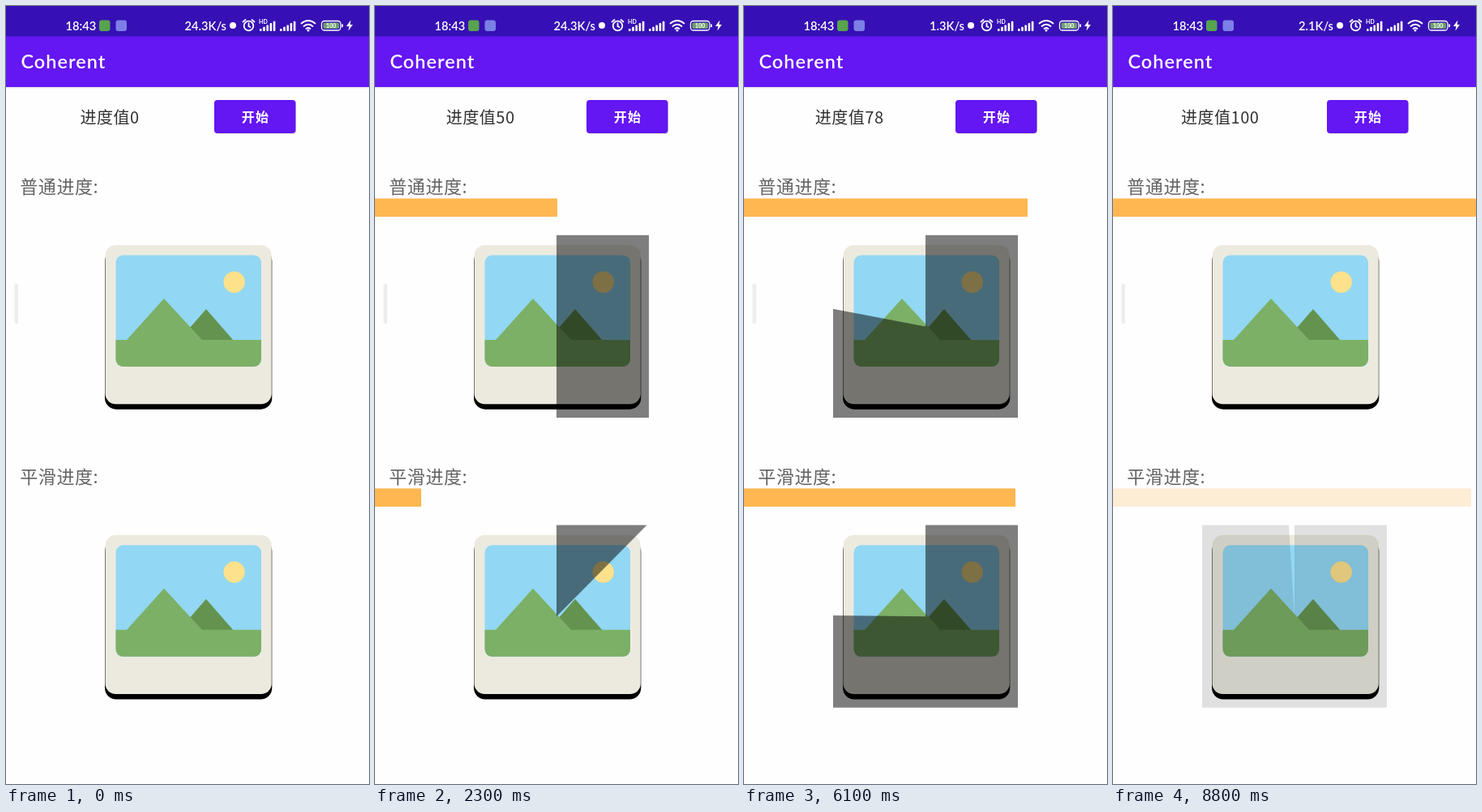
Animation, 448 px wide and 960 px high, one loop 8900 ms. Source, as an HTML page:

```html
<!DOCTYPE html>
<html lang="zh">
<head>
<meta charset="utf-8">
<title>Coherent</title>
<style>
  html, body { margin: 0; width: 100%; height: 100%; overflow: hidden; background: #fefefe; }
  svg { display: block; width: 448px; height: 960px; }
  text { font-family: "Noto Sans CJK SC", "Noto Sans CJK", "Noto Sans CJK JP", sans-serif; }
  .latin { font-family: Lato, "Open Sans", sans-serif; fill: #fff; }
  .status { font-size: 14.7px; font-weight: 600; }
  .tiny { font-size: 7px; font-weight: 700; }
  .label { font-size: 22px; letter-spacing: .6px; fill: #636363; }
  .line { fill: none; stroke: #fff; stroke-width: 1.8; stroke-linecap: round; }
</style>
</head>
<body>
<svg viewBox="0 0 448 960">
  <defs>
    <linearGradient id="shadow" x2="0" y2="1">
      <stop stop-color="#000" stop-opacity=".1"/>
      <stop offset="1" stop-color="#000" stop-opacity="0"/>
    </linearGradient>
    <filter id="soften"><feGaussianBlur stdDeviation=".7"/></filter>
    <clipPath id="sky"><rect x="135.5" y="307.5" width="179.5" height="137.5" rx="9"/></clipPath>
    <clipPath id="area"><rect x="110" y="282.8" width="228" height="225.2"/></clipPath>
    <g id="picture" filter="url(#soften)">
      <rect x="122" y="301" width="206.3" height="196.7" rx="14"/>
      <rect x="122.5" y="295" width="205.3" height="196.3" rx="13" fill="#eceadf"/>
      <g clip-path="url(#sky)">
        <rect x="135" y="307" width="181" height="139" fill="#92d7f3"/>
        <circle cx="281.7" cy="340.7" r="13.2" fill="#fee18b"/>
        <path d="M247 374L281 413H213Z" fill="#64934f"/>
        <path d="M195 361L242 412H316V446H135V412H149Z" fill="#7cb066"/>
      </g>
    </g>
    <g id="signal" fill="#fff"></g>
  </defs>

  <rect width="448" height="960" fill="#fefefe"/>
  <rect y="100" width="448" height="3" fill="url(#shadow)"/>
  <rect y="37" width="448" height="63" fill="#6416f3"/>
  <rect width="448" height="37.5" fill="#3610b4"/>
  <text class="latin" x="18.5" y="77.3" font-size="23.5" font-weight="600" letter-spacing="1">Coherent</text>

  <text class="latin status" x="73.5" y="29.5">18:43</text>
  <rect x="115" y="17.5" width="13.5" height="13.5" rx="3" fill="#57a34e"/>
  <rect x="135.5" y="17.5" width="13.5" height="13.5" rx="3" fill="#7c7fe6"/>
  <text class="latin status" id="speed" x="272" y="29.5" text-anchor="end"></text>
  <circle cx="280" cy="24" r="4" fill="#fff"/>
  <circle class="line" cx="299.5" cy="24.5" r="5.8"/>
  <path class="line" d="M299.5 21.5V25L301.5 26M292.5 19.5L295.5 17M306.5 19.5L303.5 17"/>
  <text class="latin tiny" x="312" y="22">HD</text>
  <use href="#signal" x="313"/>
  <use href="#signal" x="338"/>
  <path class="line" d="M364.5 21.5Q373 14.5 381.5 21.5M367.5 25Q373 20.5 378.5 25M370.5 28Q373 26 375.5 28"/>
  <circle cx="373" cy="30" r="1.5" fill="#fff"/>
  <rect x="389.5" y="18.5" width="23.5" height="11.5" rx="3.5" fill="#3610b4" stroke="#fff" stroke-width="1.3"/>
  <rect x="391.5" y="20.5" width="19.5" height="7.5" rx="1.5" fill="#6fa06f"/>
  <rect x="414.3" y="22.2" width="1.7" height="4" rx=".8" fill="#fff"/>
  <text class="latin tiny" x="401.2" y="27" text-anchor="middle">100</text>
  <path d="M425.5 17.5L420 25H423.5L422.5 30.5L428 23H424.7Z" fill="#fff"/>

  <text id="value" y="144.5" font-size="20" letter-spacing=".5" fill="#303030"></text>
  <g id="button">
    <rect y="117" width="101" height="41" rx="4" opacity=".12"/>
    <rect id="face" y="116" width="100.5" height="41" rx="4"/>
    <text x="33.7" y="143" font-size="16" font-weight="700" letter-spacing="1.3" fill="#fff">开始</text>
  </g>
  <rect x="10.5" y="342.5" width="4.5" height="49.5" rx="2" fill="#ededed"/>

  <g id="normal">
    <text class="label" x="17.2" y="231">普通进度:</text>
    <use href="#picture"/>
    <rect class="bar" y="237.5" height="22.5" fill="#ffb751"/>
    <g clip-path="url(#area)"><path class="mask" fill-opacity=".5"/></g>
  </g>
  <g id="smooth" transform="translate(0 357.8)">
    <text class="label" x="17.2" y="231">平滑进度:</text>
    <use href="#picture"/>
    <rect class="bar" y="237.5" height="22.5" fill="#ffb751"/>
    <g clip-path="url(#area)"><path class="mask" fill-opacity=".5"/></g>
  </g>
</svg>
<script>
const LOOP = 8900, TICK = 100;
const BAR_RATE = 0.002, MASK_RATE = 0.00225, MASK_DELAY = 15;
const updates = [[790, 5], [2203, 50], [3932, 69], [5545, 78], [7410, 100]];
const byId = id => document.getElementById(id);

byId('signal').innerHTML = [0, 1, 2, 3, 4].map(i =>
  `<rect x="${i * 4.2}" y="${28 - i * 2.3}" width="2.6" height="${3 + i * 2.3}" rx=".8"/>`).join('');

// The smooth value closes its gap to the latest update exponentially.
function progressAt(time, rate) {
  let goal = 0, smooth = 0, since = 0;
  const chase = until => goal - (goal - smooth) * Math.exp(-rate * (until - since));
  for (const [at, value] of updates) {
    if (at > time) break;
    smooth = chase(at);
    since = at;
    goal = value;
  }
  return { goal, smooth: chase(time) };
}

function pie(percent) {
  if (percent <= 0 || percent >= 100) return '';
  const angle = percent / 50 * Math.PI, r = 200, cx = 224, cy = 395.5;
  const x = cx + r * Math.sin(angle), y = cy - r * Math.cos(angle);
  return `M${cx} ${cy}V${cy - r}A${r} ${r} 0 ${percent > 50 ? 1 : 0} 1 ${x} ${y}Z`;
}

function drawProgress(id, barPercent, maskPercent, alpha) {
  const bar = byId(id).querySelector('.bar'), mask = byId(id).querySelector('.mask');
  bar.setAttribute('width', Math.ceil(barPercent * 4.48));
  mask.setAttribute('d', pie(maskPercent));
  bar.setAttribute('opacity', alpha);
  mask.setAttribute('opacity', alpha);
}

function draw(time) {
  const { goal, smooth } = progressAt(time, BAR_RATE);
  const swept = progressAt(time - MASK_DELAY, MASK_RATE).smooth;
  const digits = String(goal).length;
  drawProgress('normal', goal, goal, 1);
  drawProgress('smooth', smooth, swept, Math.min(1, ((100 - smooth) / 7) ** 0.9));
  byId('value').textContent = '进度值' + goal;
  byId('value').setAttribute('x', 95.2 - digits * 3.7);
  byId('button').setAttribute('transform', `translate(${Math.round(253.5 + digits * 3.6)} 0)`);
  byId('face').setAttribute('fill', time >= 700 && time < 1100 ? '#7129f3' : '#6416f3');
  byId('speed').textContent = time < 3000 ? '24.3K/s' : time < 7000 ? '1.3K/s' : '2.1K/s';
}

const start = performance.now();
function frame() {
  const time = (performance.now() - start) % LOOP;
  draw(Math.floor(time / TICK) * TICK);
  requestAnimationFrame(frame);
}
frame();
</script>
</body>
</html>
```
